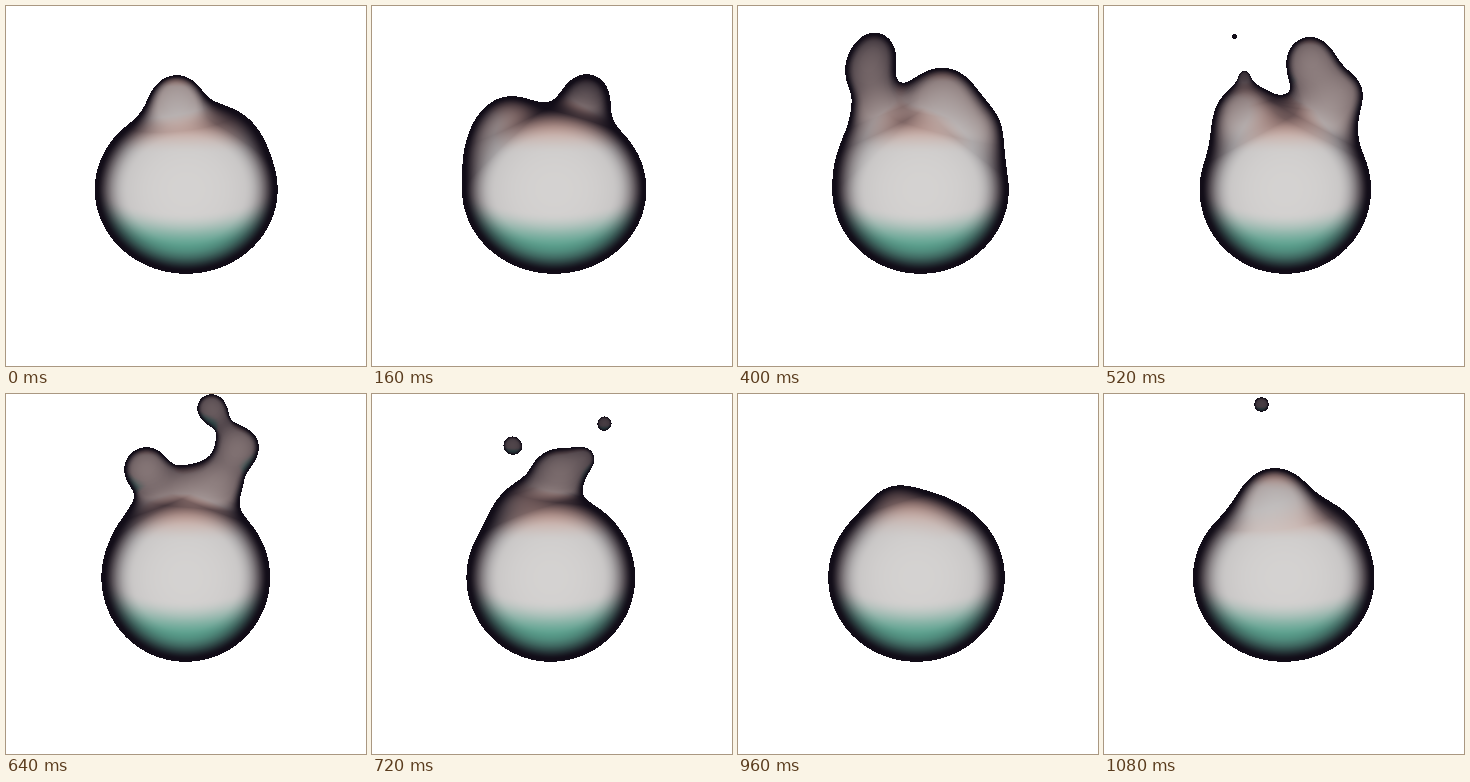
An HTML page with a canvas for the animation above (1120 ms loop, 360 px wide and 360 px high).

```html
<!DOCTYPE html>
<html>
<head>
<meta charset="utf-8">
<style>
html, body { margin: 0; width: 100%; height: 100%; overflow: hidden; background: #fff; }
canvas { display: block; width: 360px; height: 360px; }
</style>
</head>
<body>
<canvas id="stage" width="360" height="360"></canvas>
<script>
const SIZE = 360, LOOP = 1120, STEP = 40, BLEND = 34, BODY = 84;
const MID_X = 180, MID_Y = 183;
const SPEED = .3, SHRINK = .55, DEEP = 190;
const ctx = document.getElementById('stage').getContext('2d');
const cache = [];

const clamp = (v, lo, hi) => Math.max(lo, Math.min(hi, v));
const smooth = (a, b, v) => {
  const u = clamp((v - a) / (b - a), 0, 1);
  return u * u * (3 - 2 * u);
};
const wave = (t, peak) => Math.cos((t - peak) / LOOP * 2 * Math.PI);

// A drop is at (x, y) with radius r at time t0. It rises steadily,
// spreads out from the middle of the body and shrinks with height.
const drop = (t0, x, y, r, z = 0, speed = SPEED) => t => {
  const dt = ((t - t0 + 640) % LOOP + LOOP) % LOOP - 640;
  const rise = speed * dt, now = y - rise;
  return {
    x: MID_X + (x - MID_X) * clamp((220 - now) / 80, 0, 1),
    y: now, z,
    r: now > DEEP ? 0 : Math.min(1.3 * r, r - SHRINK * rise)
  };
};

const drops = [
  drop(0, 170, 93, 24, 12),
  drop(160, 214, 90, 22, -14),
  drop(400, 130, 66, 22, -8),
  drop(400, 137, 43, 14, -10),
  drop(400, 140, 104, 20),
  drop(400, 205, 104, 30),
  drop(640, 232, 53, 20),
  drop(640, 205, 14, 14),
  drop(640, 213, 88, 18),
  drop(640, 140, 75, 22),
  drop(800, 155, 93, 20, -12),
  drop(800, 187, 52, 15, -5),
  drop(1080, 157, 10, 7, 0, .85)
];

// Signed distance to the body blended with every live drop.
function makeField(t) {
  const live = drops.map(at => at(t)).filter(b => b.r > 0);
  const cx = MID_X + 2.4 * wave(t, 300);
  const sx = BODY / (88 + 4 * wave(t, 120));
  return (x, y, z) => {
    let d = Math.hypot3((x - cx) * sx, y - MID_Y, z) - BODY;
    for (const b of live) {
      const e = Math.hypot3(x - b.x, y - b.y, z - b.z) - b.r;
      const h = BLEND - Math.abs(d - e);
      d = Math.min(d, e);
      if (h > 0) d -= h * h / (4 * BLEND);
    }
    return d;
  };
}
Math.hypot3 = (a, b, c) => Math.sqrt(a * a + b * b + c * c);

// Dark rim, white front, warm above and teal below.
function shade(nx, ny, nz, z) {
  const light = (1 - Math.exp(-Math.max(0, z + 2) / 30)) * smooth(.25, .8, nz);
  const cool = smooth(.3, .85, ny + .5 * (1 - nz));
  const warm = Math.max(smooth(.42, .85, -ny), .55 * smooth(60, 15, z) * (1 - cool));
  return [
    18 + 206 * light * (1 - .6 * cool),
    13 + 209 * light * (1 - .2 * cool) * (1 - .2 * warm),
    24 + 196 * light * (1 - .32 * cool) * (1 - .27 * warm)
  ];
}

function render(t) {
  const img = ctx.createImageData(SIZE, SIZE), px = img.data.fill(255);
  const field = makeField(t);
  for (let y = 0; y < 275; y++) {
    for (let x = 80; x < 282; x++) {
      let z = 95, d = 1;
      for (let i = 0; i < 40 && z > -70; i++) {
        d = field(x, y, z);
        if (d < .25) break;
        z -= d;
      }
      if (d >= .25) continue;
      const d0 = field(x, y, z);
      const gx = field(x + .5, y, z) - d0;
      const gy = field(x, y + .5, z) - d0;
      const gz = field(x, y, z + .5) - d0;
      const len = Math.hypot3(gx, gy, gz) || 1;
      px.set(shade(gx / len, gy / len, gz / len, z), (y * SIZE + x) * 4);
    }
  }
  return img;
}

let shown = -1;
function draw() {
  const n = Math.floor(performance.now() % LOOP / STEP);
  if (n !== shown) {
    cache[n] = cache[n] || render(n * STEP);
    ctx.putImageData(cache[n], 0, 0);
    shown = n;
  }
  requestAnimationFrame(draw);
}
draw();
</script>
</body>
</html>
```
